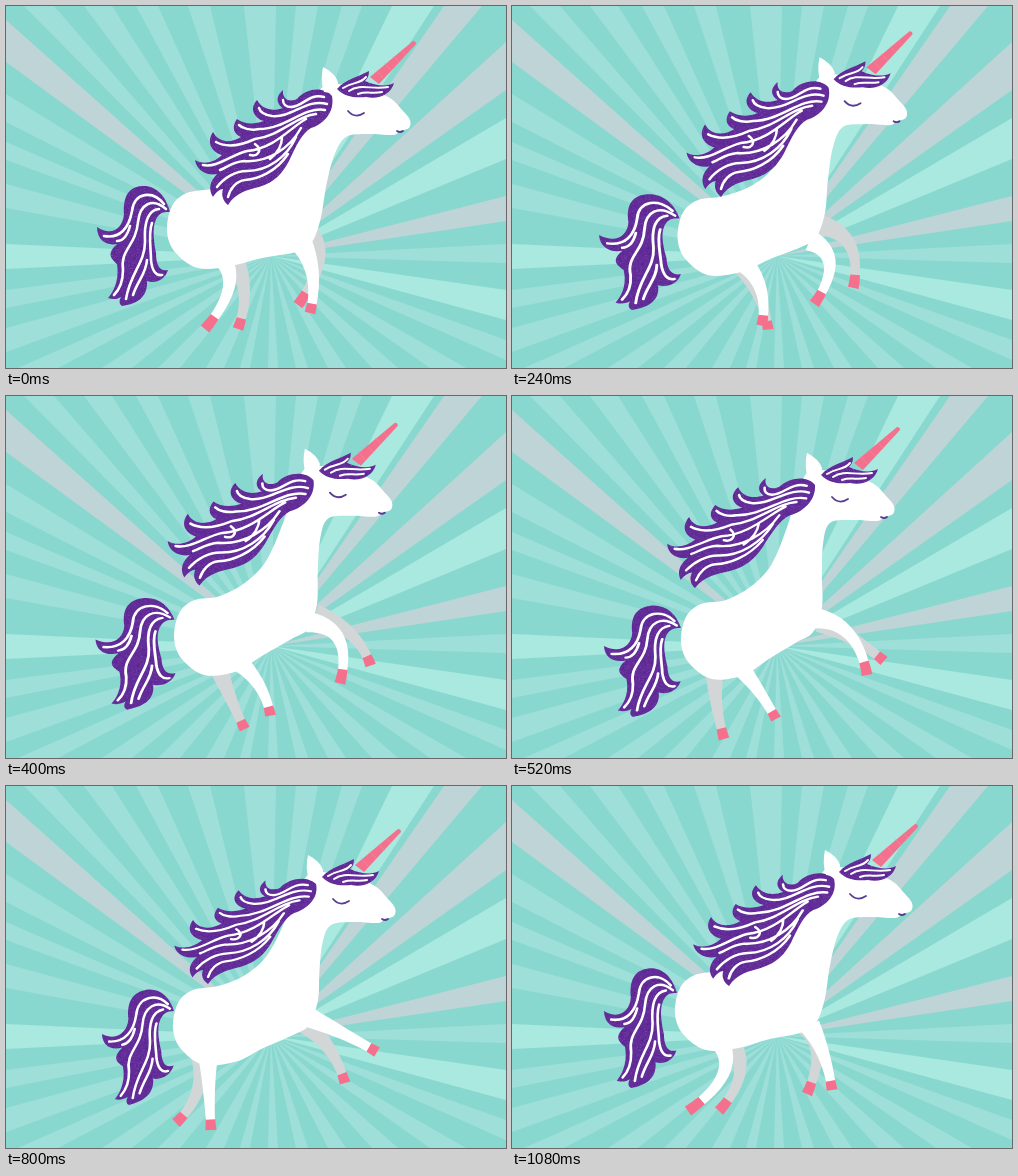
An HTML page with a canvas that plays this animation: 500 px wide and 362 px high, repeating every 1120 ms.

```html
<!DOCTYPE html>
<html lang="en">
<head>
<meta charset="utf-8">
<title>Galloping unicorn</title>
<style>
html, body { margin: 0; width: 100%; height: 100%; overflow: hidden; background: #88d8d0; }
canvas { display: block; }
</style>
</head>
<body>
<canvas id="stage" width="500" height="362"></canvas>
<script>
const ctx = document.getElementById('stage').getContext('2d');
const LOOP = 1120, STEP = 40;
const TIMES = [0, 160, 320, 520, 800, 960, 1080];
const PINK = '#f4708c', GREY = '#d3d6d6', WHITE = '#fff';

// Rays: start and end on each stage edge, with a tone
const TONES = { l: '#9fdfd9', b: '#a9e9e0', g: '#bfd4d6' };
const TOP = [[18, 48, 'l'], [78, 106, 'l'], [130, 152, 'l'], [182, 204, 'l'], [238, 270, 'l'],
  [290, 312, 'l'], [336, 356, 'l'], [386, 428, 'b'], [438, 476, 'g']];
const RIGHT = [[36, 84, 'g'], [112, 153, 'b'], [190, 215, 'g'], [238, 257, 'l'], [284, 314, 'b'], [334, 354, 'l']];
const BOTTOM = [[12, 52, 'l'], [96, 126, 'l'], [152, 174, 'l'], [200, 218, 'l'], [234, 244, 'l'],
  [262, 272, 'l'], [290, 302, 'l'], [322, 340, 'l'], [366, 392, 'l'], [424, 460, 'l']];
const LEFT = [[14, 56, 'g'], [88, 116, 'l'], [136, 154, 'l'], [178, 202, 'l'], [238, 263, 'b'], [284, 302, 'l'], [322, 346, 'l']];

// Offsets of the three body masses
const HEAD = [[0, 0], [-5, -8], [-14, -10], [-22, -4], [-15, 8], [-8, 6], [-4, 3]];
const CHEST = [[0, 0], [-1, -3], [-3, -5], [-5, 0], [-3, 3], [-3, 4], [-2, 1]];
const RUMP = [[0, 0], [3, 2], [6, 13], [8, 21], [6, 17], [5, 8], [2, 2]];

// Outline points: x, y, and mass (0 head, 1 chest, 2 rump)
const BODY = [[331, 78, 0], [362, 84, 0], [384, 92, 0], [397, 105, 0], [404, 114, 0], [403, 122, 0],
  [394, 125, 0], [387, 129, 0], [362, 128, 0], [340, 131, 0], [328, 150, .3], [320, 181, .7],
  [315, 211, 1], [306, 236, 1], [290, 246, 1], [256, 252, 1.5], [225, 260, 1.9], [192, 262, 2],
  [169, 246, 2], [161, 225, 2], [166, 200, 2], [181, 187, 2], [206, 183, 2], [236, 178, 1.6],
  [262, 164, 1.2], [286, 130, .7], [305, 97, .2], [318, 80, 0]];

// Hip, knee and hoof of every leg
const FRONT_NEAR = [[297, 240, 307, 272, 304, 307], [296, 238, 308, 266, 292, 302], [300, 230, 328, 250, 318, 293],
  [302, 222, 337, 238, 355, 279], [300, 230, 338, 248, 371, 266], [298, 238, 325, 265, 345, 290], [298, 240, 312, 270, 320, 304]];
const FRONT_FAR = [[304, 230, 312, 258, 292, 299], [306, 224, 331, 245, 326, 288], [310, 216, 343, 237, 354, 276],
  [308, 226, 343, 244, 372, 265], [300, 238, 324, 264, 339, 297], [293, 243, 305, 274, 309, 311], [294, 240, 305, 268, 295, 308]];
const BACK_NEAR = [[212, 248, 223, 280, 199, 323], [226, 250, 242, 282, 237, 321], [228, 258, 252, 284, 258, 319],
  [224, 266, 246, 294, 264, 323], [202, 266, 203, 304, 205, 344], [200, 258, 208, 296, 185, 339], [203, 250, 212, 286, 176, 325]];
const BACK_FAR = [[226, 250, 238, 284, 232, 323], [236, 250, 252, 285, 252, 323], [218, 264, 238, 297, 253, 326],
  [203, 270, 204, 304, 212, 343], [193, 262, 192, 303, 170, 337], [196, 256, 194, 294, 171, 323], [214, 250, 228, 285, 207, 325]];

// Three anchors steer each flowing shape: root, side curl, lowest tip
const MANE = [[325, 90, 206, 127, 222, 199], [320, 83, 198, 122, 214, 194], [311, 82, 186, 118, 203, 189],
  [302, 89, 176, 122, 183, 192], [309, 98, 186, 135, 202, 198], [317, 97, 193, 136, 210, 200], [321, 93, 198, 132, 217, 200]];
const TAIL = [[164, 206, 91, 221, 116, 300], [167, 209, 87, 222, 118, 301], [168, 217, 88, 237, 121, 308],
  [169, 232, 92, 250, 121, 321], [168, 225, 96, 248, 123, 319], [167, 214, 96, 237, 122, 312], [165, 207, 92, 225, 119, 302]];

const maneShape = new Path2D(`M326 90 C318 80 300 82 291 93 C282 97 276 92 277 84 C268 92 272 99 277 102
  C266 106 256 103 251 94 C242 104 250 113 258 115 C247 119 238 118 231 113 C224 123 230 129 235 131
  C224 138 212 136 207 126 C199 138 208 147 216 149 C208 157 197 159 189 154 C191 166 203 170 211 168
  C204 175 202 183 207 191 C210 186 214 183 217 183 C215 189 217 195 222 199 C230 186 242 184 253 181
  C269 176 276 168 283 155 C290 140 296 127 305 122 C318 118 329 106 326 90 Z`);
const maneLines = new Path2D(`M318 91 C302 87 297 101 285 101 C280 101 277 98 277 94
  M321 98 C301 92 286 112 266 110 C259 109 254 106 253 102 M319 104 C298 100 280 123 253 123 C244 125 236 122 233 119
  M310 108 C290 110 274 130 249 133 C236 139 221 142 210 136 M300 113 C285 121 268 143 241 145 C225 149 211 162 197 159
  M295 122 C284 142 262 157 238 155 C226 156 220 162 214 164 M290 131 C281 151 262 165 241 165 C229 165 218 172 211 181
  M282 148 C270 166 252 173 239 174 C230 175 224 183 222 191 M249 138 C257 144 252 151 244 149 M264 153 C273 146 276 137 276 131`);
const tailShape = new Path2D(`M164 206 C160 190 150 179 136 180 C120 181 117 195 118 208 C117 222 106 231 91 221
  C91 234 100 240 111 238 C101 247 104 252 111 258 C113 270 110 283 102 292 C107 294 112 293 115 291
  C113 295 113 298 116 300 C130 298 142 292 141 275 C149 278 159 274 162 264 C153 266 150 258 150 247
  C147 231 146 218 152 210 C156 205 160 206 164 206 Z`);
const tailLines = new Path2D(`M158 198 C147 184 128 186 126 205 C123 222 114 233 98 230
  M160 203 C146 191 134 198 132 216 C130 240 114 243 117 264 C117 278 112 285 108 289
  M153 203 C142 204 138 217 139 236 C139 257 124 267 120 293 M146 217 C142 228 145 242 145 254 C146 265 150 270 156 269
  M141 254 C140 268 132 274 127 289 M124 220 C121 231 116 235 111 235`);
const forelock = new Path2D(`M331 83 C340 73 352 71 363 65 C363 70 361 73 359 75 C370 80 381 81 388 77
  C385 88 373 94 360 91 C348 92 339 91 331 83 Z`);
const forelockLines = new Path2D('M337 82 C348 75 353 79 360 71 M343 85 C354 77 366 84 382 81 M352 88 C360 85 367 88 376 86');
const horn = new Path2D('M364 71 L373 78 L410 38 Q410 35 407 35 Z');
const hornLines = new Path2D('M371 65 L377 72 M379 58 L385 64 M388 51 L393 56 M396 45 L400 49');
const ear = new Path2D('M317 61 Q329 67 332 76 L331 88 L318 86 Q314 74 317 61 Z');
const face = new Path2D('M342 105 Q349 113 358 107 M391 125 Q394 127 397 125');

// Speckled purple
function makePurple() {
  const tile = document.createElement('canvas');
  tile.width = tile.height = 96;
  const c = tile.getContext('2d');
  c.fillStyle = '#632d99';
  c.fillRect(0, 0, 96, 96);
  let seed = 7;
  const rand = n => (seed = seed * 16807 % 2147483647) % n;
  for (let i = 0; i < 1700; i++) {
    c.fillStyle = i % 2 ? '#7440a8' : '#552089';
    c.fillRect(rand(96), rand(96), 1, 1);
  }
  return ctx.createPattern(tile, 'repeat');
}
const purple = makePurple();

// Periodic cubic through the key poses
function pose(track, t) {
  const n = TIMES.length;
  let i = n - 1;
  while (TIMES[i] > t) i--;
  const time = k => TIMES[(k + n) % n] + Math.floor(k / n) * LOOP;
  const key = k => track[(k + n) % n];
  const span = time(i + 1) - time(i), u = (t - time(i)) / span;
  const slope = (k, j) => (key(k + 1)[j] - key(k - 1)[j]) / (time(k + 1) - time(k - 1)) * span;
  return key(i).map((a, j) => {
    const b = key(i + 1)[j], m = slope(i, j), q = slope(i + 1, j);
    return a + u * (m + u * (3 * (b - a) - 2 * m - q + u * (2 * (a - b) + m + q)));
  });
}

function polygon(points, fill) {
  ctx.beginPath();
  points.forEach(p => ctx.lineTo(p[0], p[1]));
  ctx.fillStyle = fill;
  ctx.fill();
}

function background() {
  ctx.fillStyle = '#88d8d0';
  ctx.fillRect(0, 0, 500, 362);
  const rays = (side, at) => side.forEach(([a, b, tone]) => polygon([[265, 250], at(a), at(b)], TONES[tone]));
  rays(TOP, x => [x, 0]);
  rays(RIGHT, y => [500, y]);
  rays(BOTTOM, x => [x, 362]);
  rays(LEFT, y => [0, y]);
}

function leg(track, t, color) {
  const [ax, ay, kx, ky, bx, by] = pose(track, t);
  const cx = 2 * kx - (ax + bx) / 2, cy = 2 * ky - (ay + by) / 2;
  const edge = (u, half) => {
    const v = 1 - u;
    const x = v * v * ax + 2 * u * v * cx + u * u * bx, y = v * v * ay + 2 * u * v * cy + u * u * by;
    const dx = v * (cx - ax) + u * (bx - cx), dy = v * (cy - ay) + u * (by - cy), d = Math.hypot(dx, dy);
    return [x - dy / d * half, y + dx / d * half];
  };
  const strip = (from, to, width, fill) => {
    const left = [], right = [];
    for (let i = 0; i <= 12; i++) {
      const u = from + (to - from) * i / 12;
      left.push(edge(u, width(u)));
      right.unshift(edge(u, -width(u)));
    }
    polygon(left.concat(right), fill);
  };
  strip(0, .9, u => 4.5 + 6 * (1 - u) ** 2, color);
  strip(.87, 1, u => 4.8 + (u - .87) * 5, PINK);
}

function smooth(points) {
  const n = points.length, at = i => points[(i + n) % n];
  ctx.beginPath();
  ctx.moveTo(...at(0));
  for (let i = 0; i < n; i++) {
    const [p, a, b, q] = [at(i - 1), at(i), at(i + 1), at(i + 2)];
    ctx.bezierCurveTo(a[0] + (b[0] - p[0]) / 6, a[1] + (b[1] - p[1]) / 6,
      b[0] - (q[0] - a[0]) / 6, b[1] - (q[1] - a[1]) / 6, b[0], b[1]);
  }
}

function body(t) {
  const masses = [HEAD, CHEST, RUMP].map(track => pose(track, t));
  smooth(BODY.map(([x, y, m]) => {
    const i = Math.min(1, Math.floor(m)), u = m - i;
    const shift = j => masses[i][j] * (1 - u) + masses[i + 1][j] * u;
    return [x + shift(0), y + shift(1)];
  }));
  ctx.fillStyle = WHITE;
  ctx.fill();
}

function line(path, color, width) {
  ctx.strokeStyle = color;
  ctx.lineWidth = width;
  ctx.stroke(path);
}

function hair(shape, lines, width) {
  ctx.fillStyle = purple;
  ctx.fill(shape);
  line(lines, WHITE, width);
}

// Affine map that carries the first pose's anchors to the current ones
function flow(track, t, draw) {
  const [ax, ay, bx, by, cx, cy] = track[0], [px, py, qx, qy, rx, ry] = pose(track, t);
  const ux = bx - ax, uy = by - ay, vx = cx - ax, vy = cy - ay, det = ux * vy - uy * vx;
  const row = (p, q, r) => [((q - p) * vy - (r - p) * uy) / det, ((r - p) * ux - (q - p) * vx) / det];
  const [a, c] = row(px, qx, rx), [b, d] = row(py, qy, ry);
  ctx.save();
  ctx.transform(a, b, c, d, px - a * ax - c * ay, py - b * ax - d * ay);
  draw();
  ctx.restore();
}

function head(t) {
  ctx.save();
  ctx.translate(...pose(HEAD, t));
  ctx.fillStyle = WHITE;
  ctx.fill(ear);
  ctx.fillStyle = PINK;
  ctx.fill(horn);
  line(hornLines, '#e9879c', 1);
  hair(forelock, forelockLines, 2);
  line(face, '#5a3c94', 1.8);
  ctx.restore();
}

function draw(now) {
  const t = Math.floor(now / STEP) * STEP % LOOP;
  background();
  ctx.lineCap = 'round';
  leg(FRONT_FAR, t, GREY);
  leg(BACK_FAR, t, GREY);
  flow(TAIL, t, () => hair(tailShape, tailLines, 2.6));
  leg(BACK_NEAR, t, WHITE);
  leg(FRONT_NEAR, t, WHITE);
  body(t);
  flow(MANE, t, () => hair(maneShape, maneLines, 2.5));
  head(t);
}

const start = performance.now();
function tick() {
  draw(performance.now() - start);
  requestAnimationFrame(tick);
}
tick();
</script>
</body>
</html>
```
